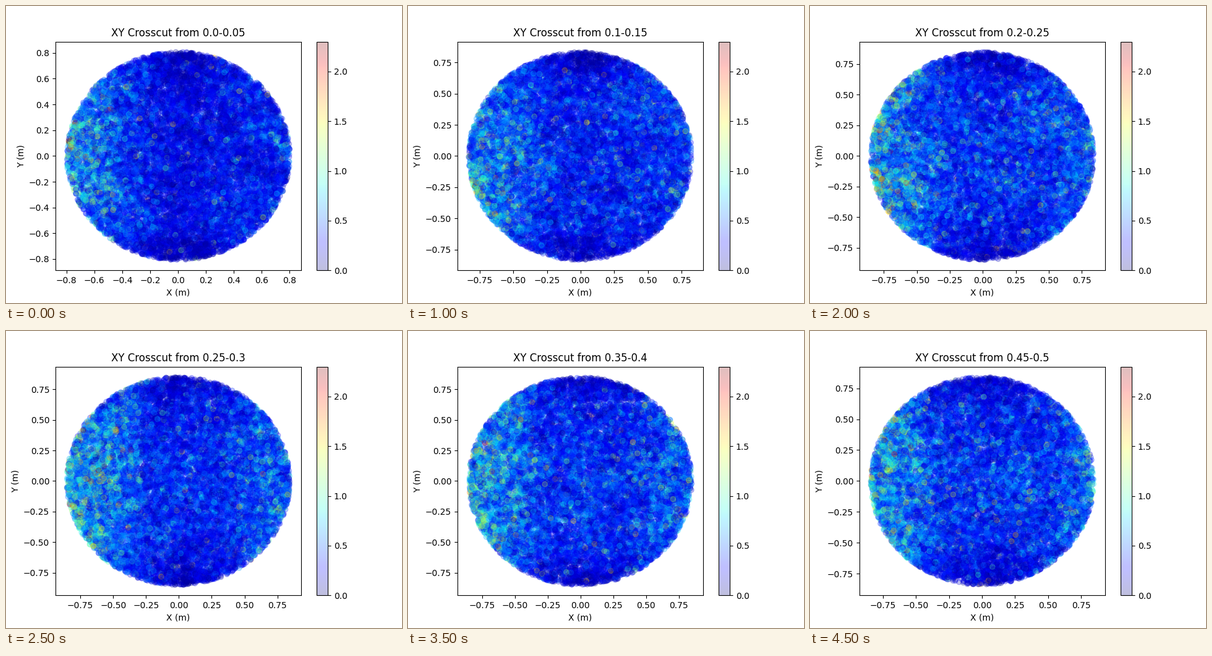
Write a matplotlib script that moves like this. It is 640 px wide and 480 px high and loops after 5000 ms.

```python
import numpy as np
import matplotlib.pyplot as plt
from matplotlib.animation import FuncAnimation

SLICES = 10
STEP = 0.05
POINTS = 15000
VMAX = 2.3
RADIUS = 0.851   # of the sphere being sliced
MIDDLE = 0.32    # height of its widest slice


def extent(i):
    """Centre in x, then half width and half height of the widest cut in a slice."""
    low, high = i * STEP, (i + 1) * STEP
    z = np.clip(MIDDLE, low, high)
    ry = np.sqrt(RADIUS ** 2 - (z - MIDDLE) ** 2)
    rx = ry - 0.0065 + 0.001 * i
    cx = 0.002 - 0.0066 * np.sin(np.pi * i / (SLICES - 1))
    return cx, rx, ry


def patches(rng, u, v, waves=14):
    """Smooth random field with unit variance."""
    total = np.zeros_like(u)
    for _ in range(waves):
        kx, ky = rng.normal(0, 14, 2)
        total += np.cos(kx * u + ky * v + rng.uniform(0, 2 * np.pi))
    return total * np.sqrt(2 / waves)


def speeds(rng, u, v, i):
    k = min(1, i / 4)
    left = np.clip((-u - 0.25) / 0.7, 0, 1) ** 1.3
    right = np.clip((u - 0.5) / 0.5, 0, 1)
    mean = 0.31 + 0.06 * k + 0.4 * left + (0.06 + 0.08 * k) * right
    calm = np.exp(-((u - 0.08) / 0.35) ** 2)
    mean *= 1 - 0.5 * calm * np.maximum(v * v, 0.5 * (1 - k))
    mean *= 1 - 0.3 * np.clip((np.abs(v) - 0.7) / 0.3, 0, 1)
    mean *= 1 + 0.12 * patches(rng, u, v)
    speed = mean * rng.gamma(3, 1 / 3, u.size)
    fast = rng.random(u.size) < 0.01 + 0.008 * k
    speed[fast] = rng.uniform(0.8, 1.7, fast.sum())
    return np.clip(speed, 0, VMAX)


def cloud(i):
    rng = np.random.default_rng(100 + i)
    r = np.sqrt(rng.random(POINTS))
    a = rng.uniform(0, 2 * np.pi, POINTS)
    u, v = r * np.cos(a), r * np.sin(a)
    return u, v, speeds(rng, u, v, i)


fig, ax = plt.subplots(figsize=(6.4, 4.8), dpi=100)
dots = ax.scatter([], [], c=[], cmap="jet", alpha=0.25, vmin=0, vmax=VMAX)
fig.colorbar(dots, ax=ax)
ax.set_xlabel("X (m)")
ax.set_ylabel("Y (m)")


def draw(i):
    cx, rx, ry = extent(i)
    u, v, speed = cloud(i)
    dots.set_offsets(np.column_stack((cx + rx * u, ry * v)))
    dots.set_array(speed)
    ax.set_xlim(cx - 1.1 * rx, cx + 1.1 * rx)
    ax.set_ylim(-1.1 * ry, 1.1 * ry)
    low, high = round(i * STEP, 2), round((i + 1) * STEP, 2)
    ax.set_title(f"XY Crosscut from {low}-{high}")
    return dots,


anim = FuncAnimation(fig, draw, frames=SLICES, interval=500, repeat=True)
plt.show()
```
